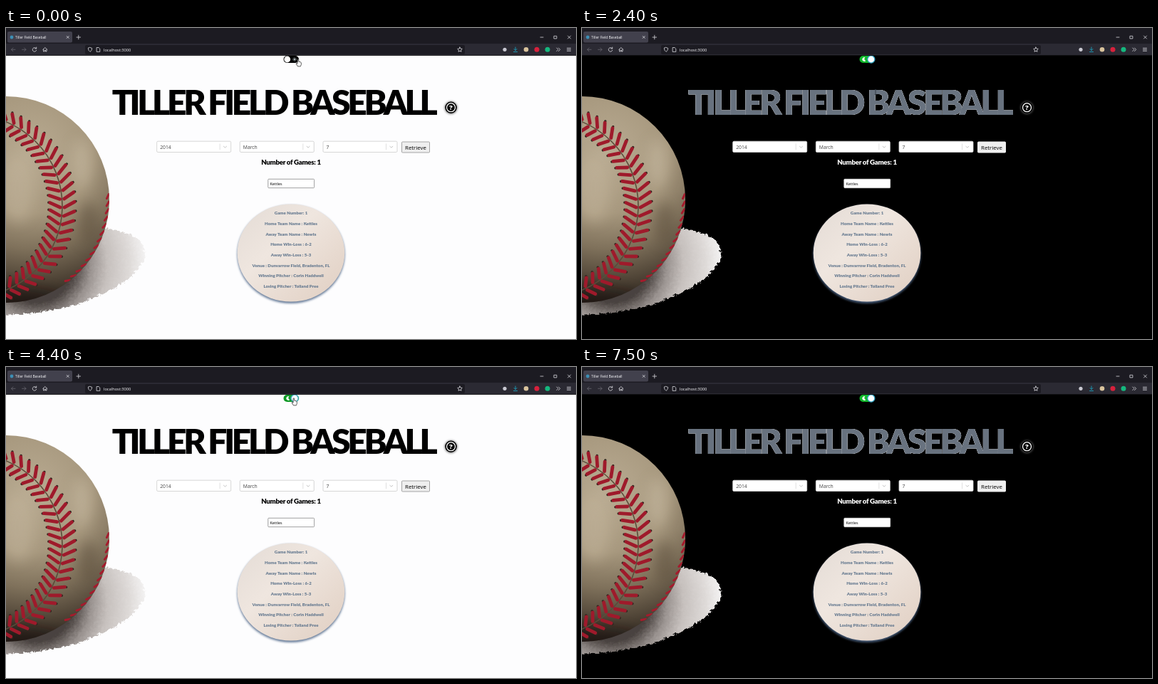
Write an HTML page that moves like this. It is 800 by 437 pixels and loops after 7.6 s.

```html
<!DOCTYPE html>
<html lang="en">
<head>
<meta charset="utf-8">
<title>Tiller Field Baseball</title>
<style>
html, body { margin: 0; width: 100%; height: 100%; overflow: hidden; background: #000; }
svg { display: block; width: 100vw; height: 100vh; font-family: "Open Sans", "Noto Sans", sans-serif; animation: theme 7.6s step-end infinite; }
.page { fill: var(--paper); }
.ink { fill: var(--ink); }
.box { fill: #fff; stroke: var(--line); }
.btn { fill: #efefef; stroke: var(--rim); }
.mid { text-anchor: middle; }
.heavy { font-family: Lato, "Open Sans", sans-serif; font-weight: 900; text-anchor: middle; }
.title { font-size: 48px; letter-spacing: -4.3px; }
.tint { fill: #68727f; filter: drop-shadow(.8px .8px 0 #eee); animation: hover 7.6s step-end infinite; }
.icon { fill: none; stroke: #e4e4ea; stroke-width: .75; stroke-linecap: round; stroke-linejoin: round; }
.dim { stroke: #6b6a73; }
.knob { animation: slide 7.6s ease-in-out infinite; }
.track { animation: track 7.6s linear infinite; }
.glow { animation: glow 7.6s step-end infinite; }
.cursor { animation: travel 7.6s ease-in-out infinite; }
.hand { animation: hand 7.6s step-end infinite; }
.arrow { animation: arrow 7.6s step-end infinite; }
.beam { animation: beam 7.6s step-end infinite; }

@keyframes theme {
  0%, 57.24% { --paper: #fdfdfe; --ink: #000; --line: #ccc; --rim: #a5a5a5; --field: #888; --ring: #0008; }
  11.18%, 87.5%, 100% { --paper: #000; --ink: #fff; --line: #ddd; --rim: #eee; --field: #ddd; --ring: #fff5; }
}
@keyframes hover {
  0%, 45.39% { opacity: 0; }
  25.66%, 97.37%, 100% { opacity: 1; }
}
@keyframes slide {
  0%, 11.18%, 61.18%, 87.5% { transform: none; }
  15.13%, 57.24%, 91.45%, 100% { transform: translateX(11px); }
}
@keyframes track {
  0%, 11.18%, 61.18%, 87.5% { fill: #000; }
  15.13%, 57.24%, 91.45%, 100% { fill: #12b82c; }
}
@keyframes glow { 0% { opacity: 0; } 10.53%, 100% { opacity: 1; } }
@keyframes travel {
  0%, 11.84% { transform: translate(410px, 44px); }
  21.05% { transform: translate(408px, 43px); }
  26.32% { transform: translate(412px, 86px); }
  31.58% { transform: translate(412px, 90px); }
  38.16% { transform: translate(562px, 92px); }
  42.11% { transform: translate(540px, 97px); }
  48.68% { transform: translate(404px, 50px); }
  51.32%, 80.26% { transform: translate(404px, 44px); }
  84.21%, 91.45% { transform: translate(405px, 45px); }
  96.05% { transform: translate(412px, 84px); }
  100% { transform: translate(420px, 100px); }
}
@keyframes hand { 0%, 49.34% { opacity: 1; } 22.37%, 92.11%, 100% { opacity: 0; } }
@keyframes arrow { 0%, 25.66%, 49.34%, 95.4%, 100% { opacity: 0; } 22.37%, 45.39%, 92.11% { opacity: 1; } }
@keyframes beam { 0%, 45.39% { opacity: 0; } 25.66%, 95.4%, 100% { opacity: 1; } }
</style>
</head>
<body>
<svg viewBox="0 0 800 437" xmlns="http://www.w3.org/2000/svg">
  <defs>
    <radialGradient id="hide" gradientUnits="userSpaceOnUse" cx="35" cy="175" r="225">
      <stop offset="0" stop-color="#b9ab92"/>
      <stop offset=".38" stop-color="#a7987e"/>
      <stop offset=".6" stop-color="#7f715b"/>
      <stop offset=".82" stop-color="#4b4033"/>
      <stop offset="1" stop-color="#1e1813"/>
    </radialGradient>
    <radialGradient id="shade" gradientUnits="userSpaceOnUse" cx="40" cy="330" r="155">
      <stop offset=".35" stop-color="#4a4340"/>
      <stop offset=".5" stop-color="#9a9390"/>
      <stop offset=".65" stop-color="#c6c0bd"/>
      <stop offset=".85" stop-color="#dedad8"/>
      <stop offset="1" stop-color="#f4f3f3"/>
    </radialGradient>
    <linearGradient id="clay" x1="0" y1="0" x2="1" y2="1">
      <stop offset="0" stop-color="#e3dbd5"/>
      <stop offset=".4" stop-color="#efe6df"/>
      <stop offset="1" stop-color="#e0cec1"/>
    </linearGradient>
    <filter id="ragged"><feTurbulence baseFrequency=".18" numOctaves="2" seed="4"/><feDisplacementMap in="SourceGraphic" scale="6" xChannelSelector="R" yChannelSelector="G"/></filter>
    <filter id="soft" x="-50%" y="-50%" width="200%" height="200%"><feGaussianBlur stdDeviation="1.4"/></filter>
    <filter id="smudge" x="-50%" y="-50%" width="200%" height="200%"><feGaussianBlur stdDeviation="9"/></filter>
    <clipPath id="round"><circle cx="0" cy="241" r="145"/></clipPath>
  </defs>

  <rect class="page" width="800" height="437"/>

  <!-- ball -->
  <path d="M100 283L143 281Q166 284 184 295Q196 306 193 322Q184 344 154 362Q128 377 96 387Q55 400 -10 402V330Z" fill="url(#shade)" filter="url(#ragged)"/>
  <circle cx="0" cy="241" r="145" fill="url(#hide)"/>
  <g clip-path="url(#round)">
    <g filter="url(#smudge)" opacity=".5">
      <ellipse cx="106" cy="190" rx="14" ry="34" fill="#c9bca4"/>
      <ellipse cx="16" cy="225" rx="24" ry="48" fill="#c4b69d"/>
      <ellipse cx="116" cy="275" rx="14" ry="30" fill="#5d503e"/>
      <ellipse cx="8" cy="385" rx="75" ry="22" fill="#15110d"/>
    </g>
    <circle cx="-49" cy="250" r="128" fill="none" stroke="#5b4c3a" stroke-width="1.6"/>
    <path id="holes" fill="none" stroke="#30261f" stroke-width="3.4" stroke-linecap="round"/>
    <path id="lace" fill="none" stroke="#9f1a2b" stroke-width="4.8" stroke-linecap="round"/>
    <path id="rimLace" fill="none" stroke="#a51b2d" stroke-width="3" stroke-linecap="round"/>
  </g>

  <!-- heading and form -->
  <g class="heavy title">
    <text class="ink" x="375" y="122.3">TILLER FIELD BASEBALL</text>
    <text class="tint" x="375" y="122.3">TILLER FIELD BASEBALL</text>
  </g>
  <circle cx="624.5" cy="112" r="9" fill="var(--ring)" filter="url(#soft)"/>
  <circle cx="624.5" cy="111.7" r="8.2"/>
  <circle cx="624.5" cy="111.7" r="6" fill="none" stroke="#fff" stroke-width="1.3"/>
  <text class="mid" x="624.5" y="115.2" font-size="9.5" font-weight="800" fill="#fff">?</text>
  <g id="selects"></g>
  <rect class="btn" x="555.5" y="160" width="39" height="15" rx="1"/>
  <text class="mid" x="575" y="170.6" font-size="7.9">Retrieve</text>
  <text class="heavy ink" x="400" y="192.4" font-size="9.7" letter-spacing="-.3">Number of Games: 1</text>
  <rect x="367.8" y="212.3" width="64.8" height="12.4" rx="1" fill="#fff" stroke="var(--field)" stroke-width=".8"/>
  <text x="370.5" y="220.6" font-size="5.4">Kettles</text>

  <!-- game card -->
  <ellipse cx="400" cy="318" rx="75.5" ry="69" fill="#51698a" opacity=".85" filter="url(#soft)"/>
  <ellipse cx="400" cy="316" rx="75.3" ry="68.6" fill="url(#clay)"/>
  <g id="card" class="heavy" font-size="6.1" fill="#667a90"></g>

  <!-- toggle -->
  <rect class="track" x="389.5" y="39" width="21.5" height="10" rx="5"/>
  <path d="M397.5 41.4A2.9 2.9 0 1 0 398.4 46A2.5 2.5 0 0 1 397.5 41.4Z" fill="#fff"/>
  <circle cx="405" cy="44" r="1.5" fill="#a9b4b8"/>
  <circle cx="405" cy="44" r="2.4" fill="none" stroke="#a9b4b8" stroke-width=".9" stroke-dasharray=".9 .98"/>
  <g class="knob">
    <circle class="glow" cx="394.8" cy="44" r="5.7" fill="#2fa3c4"/>
    <circle cx="394.8" cy="44" r="4.4" fill="#fff"/>
  </g>

  <!-- browser -->
  <rect width="800" height="22.5" fill="#1c1b22"/>
  <rect y="22" width="800" height="16.6" fill="#2b2a33"/>
  <rect y="38" width="800" height=".8" fill="#0c0c0d"/>
  <rect x="2" y="5" width="91" height="15.5" rx="2" fill="#42414d"/>
  <circle cx="8" cy="13" r="2.4" fill="#3c8fb5"/>
  <rect x="111" y="24" width="533" height="13" rx="2" fill="#1c1b22"/>
  <g fill="#fbfbfe">
    <text x="13" y="14.9" font-size="4.9">Tiller Field Baseball</text>
    <text x="137" y="32.5" font-size="5.7">localhost:3000</text>
  </g>
  <path class="icon" d="M85.2 11.4l3 3m0-3l-3 3M99 13h5.6m-2.8-2.8v5.6M750 13h4M788.5 11l4 4m0-4l-4 4"/>
  <rect class="icon" x="769.3" y="11.3" width="3.6" height="3.6"/>
  <path class="icon dim" d="M13 30.3h-5.5m2.4-2.4l-2.4 2.4 2.4 2.4M22.5 30.3h5.5m-2.4-2.4l2.4 2.4-2.4 2.4"/>
  <path class="icon" d="M42.2 28.6a2.8 2.8 0 1 0 .5 2.7M42.7 27v2h-2M51.8 30.3l3-2.8 3 2.8M52.6 30v3h1.5v-1.6h1.4v1.6h1.5v-3"/>
  <path class="icon" d="M118 27.4l2.7 1q.2 3.3-2.7 5-2.9-1.7-2.7-5zM127.5 27.5h2.6l1.7 1.7v4.2h-4.3z"/>
  <path class="icon" d="M637 27l1 2.1 2.3.3-1.7 1.6.4 2.3-2-1.1-2 1.1.4-2.3-1.7-1.6 2.3-.3z"/>
  <circle cx="700" cy="30.3" r="2.6" fill="#c9c9d2"/>
  <path class="icon" style="stroke:#18b7d8" d="M715 27v4.5m-2-2l2 2 2-2M712.5 33.5h5"/>
  <circle cx="730" cy="30.3" r="3.3" fill="#d9c39c"/>
  <circle cx="745" cy="30.3" r="3.5" fill="#d7213c"/>
  <circle cx="760" cy="30.3" r="3.5" fill="#15b77e"/>
  <path class="icon" d="M772.8 28l2.2 2.3-2.2 2.3m2.7-4.6l2.2 2.3-2.2 2.3M787.5 28.3h5m-5 2h5m-5 2h5"/>

  <!-- pointer -->
  <g class="cursor">
    <path class="hand" d="M-.8 0Q.2-.6 .8.3V3.2Q4 3.3 4.3 5V7.5Q4 8.4 3.3 9.9H-.6Q-1.6 8-3 6Q-2.5 5-.9 6.2Z" fill="#fff" stroke="#000" stroke-width=".65"/>
    <path class="arrow" d="M0 0V7.2L1.7 5.7L2.9 8.4L4 7.9L2.8 5.3H5Z" fill="#fff" stroke="#000" stroke-width=".6"/>
    <path class="beam" d="M-1.2-3.5H1.2M0-3.5V3.5M-1.2 3.5H1.2" fill="none" stroke="#29323c" stroke-width=".8"/>
  </g>
</svg>
<script>
const $ = id => document.getElementById(id);
const rad = deg => deg * Math.PI / 180;

$('selects').innerHTML = [[211.7, '2014'], [328.3, 'March'], [445, '7']].map(([x, label]) => `
  <rect class="box" x="${x}" y="159.2" width="104" height="15.3" rx="1.5" stroke-width=".8"/>
  <text x="${x + 4.5}" y="169.8" font-size="6.8" fill="#444">${label}</text>
  <path d="M${x + 88.5} 162.5v8.7" stroke="#ccc" stroke-width=".6"/>
  <path d="M${x + 93.5} 166l2.3 2.2 2.3-2.2" fill="none" stroke="#bbb" stroke-width=".9"/>`).join('');

$('card').innerHTML = [
  'Game Number: 1',
  'Home Team Name : Kettles',
  'Away Team Name : Newts',
  'Home Win-Loss : 6-2',
  'Away Win-Loss : 5-3',
  'Venue : Dunvarrow Field, Bradenton, FL',
  'Winning Pitcher : Corin Haddwell',
  'Losing Pitcher : Tolland Pree',
].map((line, i) => `<text x="400" y="${262.3 + i * 14.64}">${line}</text>`).join('');

// Chevron laces along the seam, in polar coordinates around its centre
const seam = (r, a) => `${(-49 + r * Math.cos(a)).toFixed(1)} ${(250 + r * Math.sin(a)).toFixed(1)}`;
let lace = '', holes = '';
for (let deg = -68; deg <= 70; deg += 5.3) {
  const a = rad(deg), reach = 10 + 7 * Math.cos(a);
  for (const side of [-1, 1]) {
    const tip = seam(128 + side * reach, a - .055);
    lace += `M${seam(128 + side * 3, a)}L${tip}`;
    holes += `M${tip}L${seam(128 + side * (reach + 2), a - .06)}`;
  }
}
$('lace').setAttribute('d', lace);
$('holes').setAttribute('d', holes);

// Laces on the far edge
let rim = '';
for (let deg = -3; deg <= 52; deg += 4.2) {
  const at = (r, d) => `${r * Math.cos(rad(d))} ${241 + r * Math.sin(rad(d))}`;
  rim += `M${at(144.5, deg)}L${at(141.5, deg + 2.4)}`;
}
$('rimLace').setAttribute('d', rim);
</script>
</body>
</html>
```
